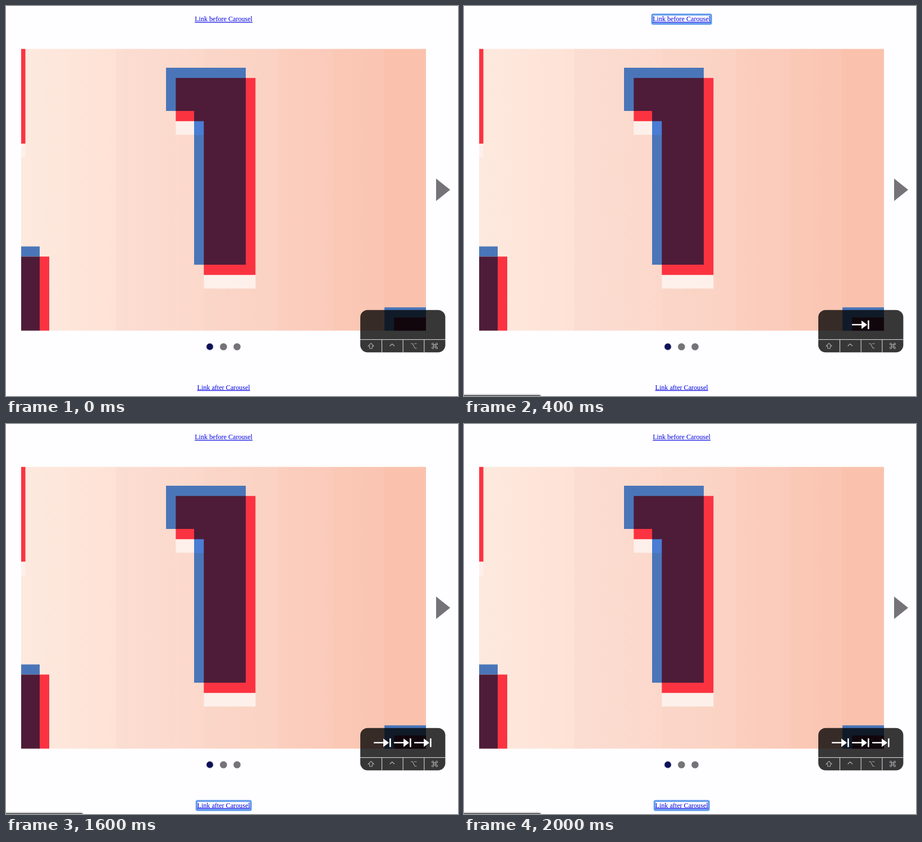
Write an HTML page that moves like this. It is 805 px wide and 695 px high and loops after 2.67 s.

```html
<!DOCTYPE html>
<html lang="en">
<head>
<meta charset="utf-8">
<title>Carousel keyboard focus</title>
<style>
  html, body { margin: 0; width: 100%; height: 100%; overflow: hidden; background: #fefdff; }
  svg { display: block; }
  .link { font: 12.1px "Liberation Serif", Times, serif; text-anchor: middle; fill: #0000e4; text-decoration: underline; }
  .ring { fill: none; stroke: #5b97ea; stroke-width: 2.4; }
  .glow { fill: none; stroke: #a9c9f7; stroke-width: 4; }
  .blue { fill: #4a76b9; }
  .red { fill: #fb3341; }
  .dark { fill: #4e1c38; }
  .pale { fill: #fdf0ea; }
  .icon { fill: none; stroke: #a9a7aa; stroke-width: 1.1; }
</style>
</head>
<body>
<svg width="805" height="695" viewBox="0 0 805 695">
  <defs>
    <linearGradient id="peach">
      <stop offset="0" stop-color="#fde9df"/>
      <stop offset=".234" stop-color="#fee2d5"/>
      <stop offset=".236" stop-color="#fbddd2"/>
      <stop offset=".45" stop-color="#fcd8cb"/>
      <stop offset=".454" stop-color="#fad6c8"/>
      <stop offset=".633" stop-color="#fbd2c3"/>
      <stop offset=".637" stop-color="#fbcebe"/>
      <stop offset=".768" stop-color="#fbcaba"/>
      <stop offset=".771" stop-color="#fac9b6"/>
      <stop offset=".894" stop-color="#fac5b2"/>
      <stop offset=".898" stop-color="#fac2ad"/>
      <stop offset="1" stop-color="#fac2ad"/>
    </linearGradient>
    <path id="digit" d="M285 110H427V461H335V187H285Z"/>
    <clipPath id="overlap"><use href="#digit"/></clipPath>
    <filter id="soft" x="-10%" y="-100%" width="120%" height="300%"><feGaussianBlur stdDeviation="1.5"/></filter>
    <g id="tab">
      <path d="M0 567.9H20" stroke-width="2.4"/>
      <path d="M17 560.5L27 567.9L17 575.5Z" stroke="none"/>
      <path d="M29.3 560.3V575.7" stroke-width="2.6"/>
    </g>
  </defs>

  <rect width="805" height="695" fill="#fefdff"/>
  <g id="linkRings"></g>
  <text class="link" x="387.6" y="27.4">Link before Carousel</text>
  <text class="link" x="387.6" y="683.6">Link after Carousel</text>

  <!-- slide -->
  <rect x="27" y="76.5" width="721" height="502" fill="url(#peach)"/>
  <path class="red" d="M27 76.5H34.5V245.5H27Z"/>
  <path class="pale" d="M27 245.5H34.5V270H27Z"/>
  <path class="blue" d="M27 428.5H60V446.5H27ZM674 537H748V578.5H674Z"/>
  <path class="dark" d="M27 446.5H60V578.5H27ZM691 555H748V578.5H691Z"/>
  <path class="red" d="M60 446.5H77V578.5H60Z"/>
  <use class="pale" href="#digit" x="17.3" y="42.5"/>
  <use class="red" href="#digit" x="17.3" y="18.2"/>
  <use class="blue" href="#digit"/>
  <path fill="#4a7dd4" d="M335 205H353V230H335Z"/>
  <g clip-path="url(#overlap)"><use class="dark" href="#digit" x="17.3" y="18.2"/></g>
  <rect id="slideRing" x="24" y="73.3" width="727" height="508.2" fill="none" stroke="#7cc6f8" stroke-width="6"/>

  <!-- controls -->
  <g fill="#757377">
    <path d="M766 307.5L791 327.5L766 347.5Z"/>
    <circle cx="387.3" cy="607.2" r="6.3"/>
    <circle cx="411.5" cy="607.2" r="6.3"/>
    <circle cx="363" cy="607.2" r="5.9" fill="#0e1159" stroke="#6f7092" stroke-width=".7"/>
  </g>

  <!-- key display -->
  <rect x="631" y="541.7" width="151.4" height="75.5" rx="13" fill="#000" fill-opacity=".78"/>
  <path d="M631 594.4H782.4M669.4 594.4V617M707.1 594.4V617M744.8 594.4V617" stroke="#e6e4e7" fill="none"/>
  <g class="icon">
    <path d="M650 601L655 606H652.4V610.2H647.6V606H645Z"/>
    <path d="M683.5 606L687.7 602.2L691.9 606" stroke-width="1.4"/>
    <path d="M721 601.7H724.2L728.2 609.8H731.5M727 601.7H731.5"/>
    <path d="M761.7 603.9H765.3V607.5H761.7ZM761.7 603.9H760.2A1.6 1.6 0 1 1 761.7 602.2ZM765.3 603.9V602.2A1.6 1.6 0 1 1 766.8 603.9ZM765.3 607.5H766.8A1.6 1.6 0 1 1 765.3 609.2ZM761.7 607.5V609.2A1.6 1.6 0 1 1 760.2 607.5Z"/>
  </g>
  <g id="tabs" fill="#fff" stroke="#fff"></g>

  <!-- browser status bubble -->
  <g id="status">
    <rect x="-5" y="693" width="142" height="10" rx="3" fill="#000" opacity=".45" filter="url(#soft)"/>
    <rect x="-5" y="693.8" width="142" height="10" rx="3" fill="#3c3b3d"/>
  </g>
</svg>
<script>
  const LOOP = 2670, PRESSES = [200, 870, 1600], PITCH = 36;
  const get = id => document.getElementById(id);
  const show = (el, on) => el.setAttribute("visibility", on ? "visible" : "hidden");

  const makeRing = (x, y, w, h) => {
    const box = `x="${x}" y="${y}" width="${w}" height="${h}" rx="2"`;
    return `<g><rect class="glow" ${box}/><rect class="ring" ${box}/></g>`;
  };
  get("linkRings").innerHTML =
    makeRing(335.2, 15.2, 104.8, 16.6) + makeRing(339.4, 671.8, 96.6, 16.2);
  get("tabs").innerHTML = PRESSES.map((_, i) => `<use href="#tab" x="${i * PITCH}"/>`).join("");

  const [beforeRing, afterRing] = get("linkRings").children;
  const tabs = [...get("tabs").children];

  function draw(now) {
    const t = now % LOOP;
    const count = PRESSES.filter(p => t >= p).length;
    show(beforeRing, count === 1);
    show(get("slideRing"), count === 2);
    show(afterRing, count === 3);
    tabs.forEach((tab, i) => show(tab, i < count));
    get("tabs").setAttribute("transform", `translate(${709 - count * PITCH / 2})`);
    // the bubble fades in over three steps
    const step = Math.floor((t - 100) / 100);
    get("status").setAttribute("opacity", Math.max(0, Math.min(1, step / 3)));
    requestAnimationFrame(draw);
  }
  draw(performance.now());
</script>
</body>
</html>
```
